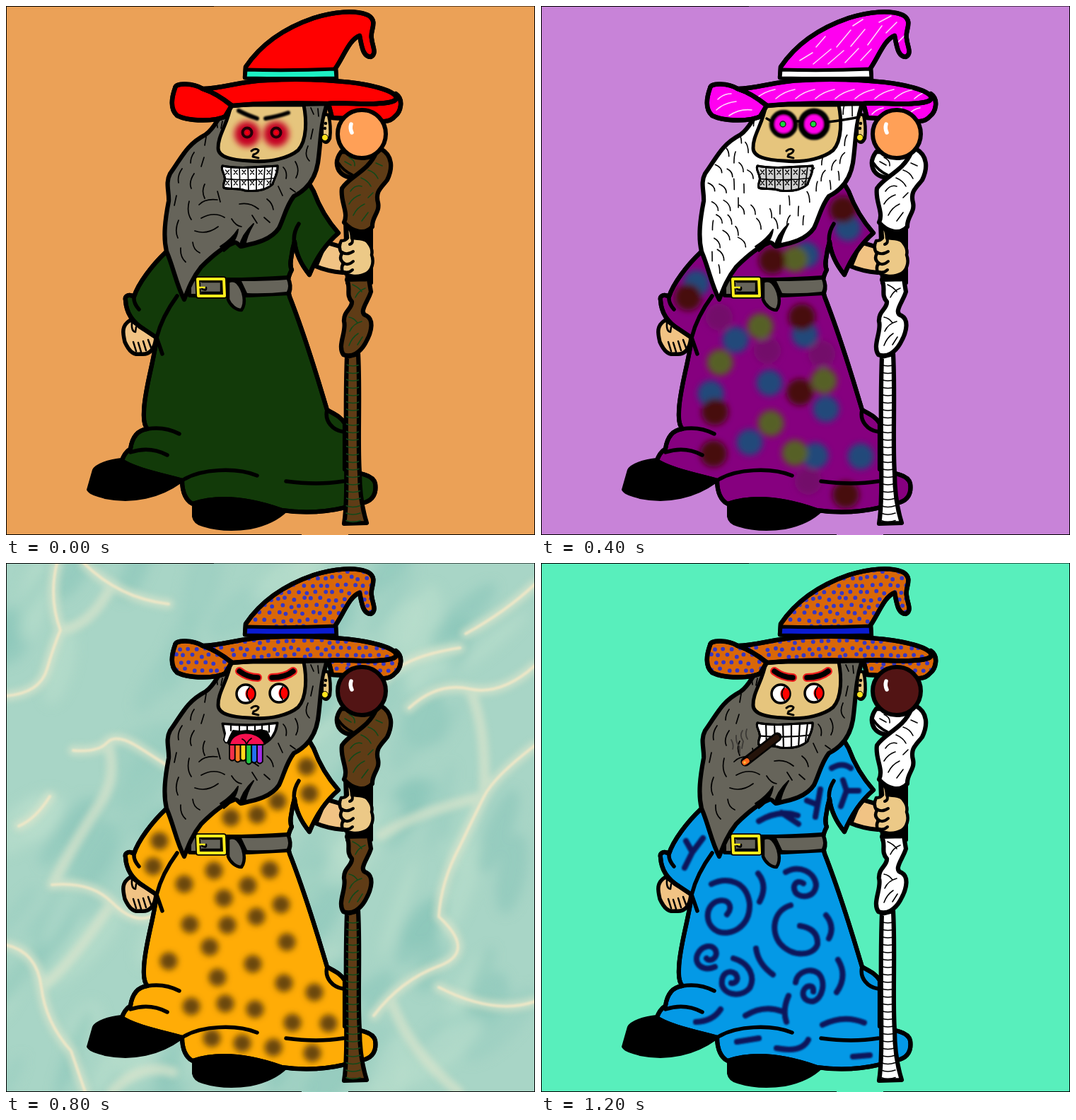
Write an HTML page that moves like this. It is 748 px wide and 748 px high and loops after 1400 ms.

```html
<!DOCTYPE html>
<html lang="en">
<head>
<meta charset="utf-8">
<title>Wizard wardrobe</title>
<style>
html, body { margin: 0; width: 100%; height: 100%; overflow: hidden; }
svg { display: block; width: 100vw; height: 100vh; }
</style>
</head>
<body>
<svg id="stage" viewBox="0 0 748 748" stroke-linecap="round" stroke-linejoin="round"></svg>
<script>
const STEP = 200;
const SKIN = '#e6c57d', FIST = '#ecc987', ARM = '#f1c384', GREY = '#66645a';

// Drawing helpers
const shape = (d, fill, w = 6.2, stroke = '#000') =>
  `<path d="${d}" fill="${fill}" stroke="${stroke}" stroke-width="${w}"/>`;
const line = (d, w = 6, stroke = '#000') => shape(d, 'none', w, stroke);
const disc = (x, y, r, fill, extra = '') =>
  `<circle cx="${x}" cy="${y}" r="${r}" fill="${fill}" ${extra}/>`;
const rect = (x, y, w, h, fill, extra = '') =>
  `<rect x="${x}" y="${y}" width="${w}" height="${h}" fill="${fill}" ${extra}/>`;
const group = (body, attrs) => `<g ${attrs}>${body}</g>`;
const pairs = list => list.trim().split(/\s+/).map(p => p.split(',').map(Number));
const dots = (list, r, fill) => pairs(list).map(([x, y]) => disc(x, y, r, fill)).join('');

function random(seed) {
  return () => (seed = (seed * 16807) % 2147483647) / 2147483647;
}

// Outlines shared by every costume
const ROBE = 'M242,330 L226,348 C207,366 187,392 181,411 C175,407 167,409 169,416 C170,436 180,448 195,457 L213,469 ' +
  'C210,500 195,545 195,574 Q194,592 200,598 C184,600 178,612 176,626 Q167,632 164,643 C180,655 225,664 249,671 ' +
  'C249,688 255,700 264,704 C305,690 350,699 390,713 C425,718 455,715 480,709 L503,703 C520,700 524,688 522,675 ' +
  'C520,667 511,663 500,661 L479,655 L479,590 C472,579 462,576 454,571 C441,528 426,475 401,411 ' +
  'C397,397 397,386 404,373 C400,365 404,355 405,345 L408,333 C410,352 420,369 429,380 C440,353 455,334 470,321 ' +
  'C455,304 443,284 435,262 L428,250 Z';
const BEARD = 'M318,142 C300,151 299,170 282,182 C255,196 248,215 232,237 C225,250 231,263 230,276 ' +
  'C225,302 222,326 227,347 C237,370 241,395 252,415 C258,399 264,384 276,369 C290,355 308,340 322,335 ' +
  'C326,332 328,338 332,340 C350,336 374,332 386,314 C393,300 396,283 407,269 C429,258 438,240 441,222 ' +
  'C445,196 444,170 454,138 Z';
const FACE = 'M318,140 C314,166 299,184 300,201 C300,214 320,218 344,219 C376,222 401,214 413,204 ' +
  'C426,190 425,160 421,140 Z';
const CONE = 'M338,101 L339,86 C362,52 397,30 435,17 C464,8 494,5 512,13 C527,22 514,35 517,46 ' +
  'C518,57 525,67 516,72 C505,72 503,58 500,42 C486,47 478,70 466,88 L467,104 Z';
const BRIM = 'M278,117 C306,117 330,106 370,105 C420,102 490,105 525,115 C548,121 557,129 549,134 ' +
  'C530,142 485,136 456,138 C408,137 360,137 320,141 C306,130 294,122 278,117 Z';
const LOBE = 'M278,117 C265,109 240,108 239,116 C233,133 233,147 242,155 C260,164 298,163 310,156 L319,141 C306,130 294,122 278,117 Z';
const BACK = 'M456,138 C485,136 530,142 549,134 Q554,129 551,124 C563,132 558,150 550,156 C540,168 525,162 500,160 L461,158 Z';
const MOUTH = 'M306,226 C330,231 360,227 384,226 C385,237 378,246 377,252 C365,263 347,262 338,261 C327,257 315,260 308,257 ' +
  'C306,250 311,247 309,242 C309,237 303,231 306,226 Z';
const POLE = 'M482,496 L498,492 C501,550 497,620 500,660 C500,690 505,715 510,731 L478,732 C485,690 478,600 482,496 Z';
const TWIST = 'M530,202 C547,211 547,230 539,246 C530,258 522,262 526,278 C529,292 517,298 518,312 C508,324 490,320 478,306 ' +
  'C485,292 472,276 475,258 C484,242 512,234 523,208 Z';
const LOOP = 'M474,206 C462,222 468,240 489,243 C500,237 516,231 520,209 Z';
const KNOT = 'M482,387 C488,400 480,408 489,418 C490,428 477,431 478,446 C482,460 468,480 477,493 C490,498 501,489 508,477 ' +
  'C519,458 519,443 510,438 C497,434 512,418 516,404 L513,386 Z';

const clip = (id, ...ds) =>
  `<clipPath id="${id}">${ds.map(d => `<path d="${d}"/>`).join('')}</clipPath>`;
const blur = (id, n) =>
  `<filter id="${id}" x="-50%" y="-50%" width="200%" height="200%"><feGaussianBlur stdDeviation="${n}"/></filter>`;
const defs = '<defs>' + clip('inRobe', ROBE) + clip('inHat', CONE, BRIM, LOBE, BACK) + clip('inBeard', BEARD) +
  clip('inMouth', MOUTH) + clip('inPole', POLE) + blur('soft', 1) + blur('fog', 4.5) + blur('mist', 8) + '</defs>';

// Background
function water() {
  const rnd = random(77);
  let pools = '';
  for (let i = 0; i < 110; i++) {
    const x = rnd() * 748, y = rnd() * 748, tilt = 10 + rnd() * 45;
    pools += `<ellipse cx="${x}" cy="${y}" rx="${10 + rnd() * 20}" ry="${35 + rnd() * 45}" ` +
      `fill="${['#86c4b7', '#bcdfcd', '#98cebf'][i % 3]}" opacity=".5" transform="rotate(${tilt} ${x} ${y})"/>`;
  }
  const ripples = 'M0,188 Q48,184 58,150 T77,95 Q60,50 72,0 M95,265 Q130,268 143,254 T190,262 L226,285 ' +
    'M0,540 Q44,550 50,600 T92,690 L112,748 M65,455 Q120,450 150,480 T205,500 M18,372 Q42,362 62,330 ' +
    'M110,0 Q160,50 230,58 M532,168 Q560,132 642,120 M748,145 Q700,188 655,178 T570,205 M748,30 Q705,70 650,100 ' +
    'M748,258 Q690,302 676,330 T642,400 M520,640 Q558,590 612,570 T612,500 Q615,450 642,400 M612,600 Q690,640 748,620 ';
  const folds = 'M545,620 Q570,690 640,748 M150,748 Q190,705 236,720 M530,385 Q580,352 676,330 M77,95 Q120,90 150,30 ' +
    'M143,254 Q160,300 130,345 T65,455 M50,600 Q90,570 150,480 M655,178 Q680,230 676,330';
  return rect(0, 0, 748, 748, '#a8d5c6') + group(pools, 'filter="url(#mist)"') +
    group(line(ripples + folds, 15, '#dbe5cc'), 'filter="url(#fog)" opacity=".65"') +
    group(line(ripples, 4, '#f6e8c6'), 'filter="url(#soft)" opacity=".8"');
}

// Robes
const plain = () => '';
const spots = () => group(dots('425,288 429,326 384,337 318,360 355,356 217,393 208,429 294,435 373,434 342,456 ' +
  '252,454 308,474 389,483 260,511 313,512 354,500 397,536 288,543 230,563 349,567 299,586 393,594 436,607 ' +
  '262,627 310,623 352,631 405,650 456,651 291,672 334,679 378,685 433,693', 12.5, '#6b4707'), 'filter="url(#fog)"');
const blotches = () => group(
  dots('252,440 320,487 397,492 378,672', 19, '#73106b') +
  dots('434,314 375,352 220,392 275,472 373,465 323,533 240,548 403,570 295,617 388,636 452,637', 18.5, '#20487a') +
  dots('359,358 310,453 253,504 400,530 325,590 359,632', 18.5, '#566128') +
  dots('427,288 327,360 208,412 369,440 366,546 246,574 244,633 431,691', 19, '#460810'), 'filter="url(#fog)"');
const swirls = () => {
  const ink = d => line(d, 8, '#08165c');
  return group(ink('M241,454 C264,443 291,450 295,482 C296,515 268,528 250,521 C230,511 232,484 250,478 C264,474 273,485 263,497 ' +
    'M307,439 Q321,456 309,479 M346,437 C365,426 387,437 389,455 C388,473 368,475 360,466 C354,455 362,447 371,453 ' +
    'M353,484 C329,491 324,520 338,538 C355,558 386,556 391,539 Q392,517 366,513 M403,498 Q416,514 407,531') +
  ink('M246,571 C230,578 216,568 221,554 C226,542 241,537 247,548 C251,559 238,565 234,559 M304,545 Q307,567 328,582 ' +
    'M272,559 C296,566 303,586 295,601 C284,614 261,612 256,597 C254,580 266,574 275,581 C281,589 275,595 269,594 ' +
    'M360,593 C362,578 380,572 392,580 C404,592 398,617 384,620 C369,620 367,605 376,599 Q386,596 385,606 M420,561 Q434,584 418,607') +
  ink('M289,640 Q315,624 341,634 M350,612 Q341,632 347,649 M219,649 Q243,648 254,631 M398,653 Q428,638 457,650 ' +
    'M277,677 L308,672 M333,686 Q369,693 378,674 M441,698 L465,696 M308,365 Q336,348 363,357 M340,353 L364,369 ' +
    'M376,336 L389,341 M395,320 L388,359 M411,290 Q426,281 438,290 M427,307 L432,322 L449,322 M432,322 L424,344 ' +
    'M205,393 L214,409 L229,389 M214,409 L203,431'), 'filter="url(#soft)"');
};

const ROBES = {
  green: ['#123a09', plain], purple: ['#86007f', blotches],
  blue: ['#0499e6', swirls], yellow: ['#ffac06', spots]
};

function robe(kind) {
  const [fill, pattern] = ROBES[kind];
  return shape('M163,640 C145,642 127,648 123,656 L115,684 C118,690 127,692 140,696 C180,704 218,695 247,674 Z', '#000', 2) +
    shape('M264,698 L264,722 Q266,732 278,735 C300,742 325,742 345,739 C370,734 385,726 397,714 C355,696 300,690 264,698 Z', '#000', 2) +
    shape('M452,334 L438,368 Q454,375 476,377 L479,342 Z', ARM) +
    shape('M176,444 C163,452 165,462 168,475 C174,488 180,494 190,492 C202,494 211,486 212,468 Z', ARM, 5.5) +
    line('M178,448 Q177,460 183,461 L184,454 M180,475 L184,488 M187,476 L191,489 M194,474 L198,487 M201,472 L205,483', 2.5) +
    shape(ROBE, fill) + group(pattern(), 'clip-path="url(#inRobe)"') + line(ROBE) +
    line('M200,598 Q224,594 245,605 M176,631 Q203,622 228,635 M249,671 C275,654 325,652 355,664 ' +
      'M396,672 Q440,678 477,672 M414,308 Q405,322 408,337 M242,410 Q220,440 213,469 L221,492 ' +
      'M181,411 Q180,420 188,429 M454,571 C450,587 462,600 477,602', 5.5);
}

function belt() {
  return shape('M258,386 Q330,389 398,384 Q404,396 400,406 Q330,411 260,409 Z', '#000') +
    shape('M262,389 L308,389 L309,407 L262,407 Z', GREY, 0) +
    shape('M333,389 Q370,389 397,387 Q401,396 397,404 Q370,407 341,406 Z', GREY, 0) +
    shape('M314,390 Q321,386 327,391 C337,402 340,420 333,430 C325,430 317,423 314,415 Z', GREY, 4.5) +
    line('M271,386 L308,386 L309,410 L272,410 Z', 7.5) +
    line('M271,386 L308,386 L309,410 L272,410 Z', 4, '#ffec1c') + line('M272,398 L281,398', 2.5, '#ffec1c') +
    line('M277,390 L304,390 L304,405 L277,405 M277,400 Q284,404 283,398', 2.5);
}

// Beards
const HAIRS = '302,164 282,188 291,200 264,207 274,214 251,230 267,236 283,228 296,238 241,256 257,258 273,252 ' +
  '287,258 246,283 263,282 279,278 243,310 252,301 267,302 284,288 300,288 325,293 338,288 ' +
  '351,275 364,290 378,270 390,255 384,235 399,240 399,217 414,225 426,215 421,240 431,190 428,147 ' +
  '440,148 409,253 371,303 350,303 332,307 308,308 277,318 262,324 249,335 284,334 242,354 254,352 252,372';
const CURLS = 'M298,162 L299,172 M306,163 L304,173 M283,185 L281,197 M266,207 Q261,214 261,222 M280,214 L276,227 M249,230 Q242,240 244,250 ' +
  'M266,237 Q258,249 262,258 M241,268 L238,282 M281,252 Q276,262 281,272 M259,276 Q255,292 262,302 M244,303 Q238,317 243,328 ' +
  'M276,300 Q294,290 309,299 M273,281 Q281,272 299,274 M299,262 L303,277';
const CURLS2 = 'M267,318 Q284,324 300,312 M247,342 Q246,355 254,362 M264,334 Q265,345 274,349 M319,301 Q325,311 333,312 M330,280 Q345,277 357,287 ' +
  'M348,296 L355,307 M369,273 Q377,279 378,288 M385,255 L391,268 M392,228 Q398,234 396,244 M409,220 Q416,232 410,243 ' +
  'M427,198 Q421,211 429,219 M434,174 L431,188 M431,144 L435,153 M441,145 L442,156 M365,299 L373,306 M402,258 L409,263';

function beard(kind) {
  const white = kind === 'white';
  const rnd = random(31);
  const hair = pairs(HAIRS).map(([x, y]) => {
    const lean = (x < 345 ? 2 : -2) + rnd() * 14 - 5, drop = 11 + rnd() * 5;
    return `M${x - lean / 2},${y - drop / 2} q${lean},${drop / 3} ${lean},${drop}`;
  }).join('');
  return shape(BEARD, white ? '#fff' : GREY) +
    group(white ? line(hair, 1.6) : line(CURLS + CURLS2, 1.7), 'clip-path="url(#inBeard)"') +
    shape('M308,347 Q326,334 328,316 Q319,330 303,340 Z', '#000', 2) +
    shape('M330,341 Q333,324 350,308 Q340,325 338,339 Z', '#000', 2);
}

// Faces
const NOSE = line('M347,205 Q353,200 357,204 Q357,208 350,210 L349,213 L357,215', 3);
const FACES = {
  angry() {
    const brows = 'M330,153 Q342,162 356,162 M376,162 Q395,162 406,153';
    const eye = (x, y) => disc(x, y, 13, '#fff', 'stroke="#000" stroke-width="3.5"') +
      `<ellipse cx="${x + 6}" cy="${y}" rx="6.5" ry="8.5" fill="#f00"/>` + line(`M${x + 5},${y - 9} q-7,9 0,18`, 2);
    return line(brows, 12, '#ee1c1c') + line(brows, 7.5) + eye(339, 185) + eye(386, 184);
  },
  glow() {
    const eye = x => disc(x, 181, 18, '#c40022', 'filter="url(#fog)"') +
      disc(x, 179, 6.5, '#d00020', 'stroke="#240006" stroke-width="4"') + disc(x, 179, 2, '#f00');
    return eye(341) + eye(382) + group(line('M329,148 Q340,154 355,159 M367,159 Q385,156 399,151', 6), 'filter="url(#soft)"');
  },
  glasses() {
    const lens = (x, r, rim) => disc(x, 167, r, '#ff00e8', `stroke="#000" stroke-width="${rim}" filter="url(#soft)"`) +
      `<ellipse cx="${x - 1}" cy="167" rx="4" ry="4" fill="#18d83c" stroke="#222" stroke-width="1.5"/>`;
    return line('M362,163 L369,163 M326,163 L319,159 M406,164 Q430,161 450,157', 3.5) + lens(343, 16.5, 7.5) + lens(386, 18, 9);
  },
  dizzy() {
    const coil = x => {
      let d = '';
      for (let i = 0; i <= 44; i++) {
        const a = i * .36, r = .8 + i * .21;
        d += `${i ? 'L' : 'M'}${(x + r * Math.cos(a) * 1.08).toFixed(1)},${(178 + r * Math.sin(a)).toFixed(1)}`;
      }
      return line(d, 2, '#f52a1c');
    };
    return group(disc(321, 202, 12, '#000') + disc(380, 207, 12, '#000'), 'filter="url(#fog)" opacity=".9"') +
      coil(343) + coil(377) +
      line('M335,167 Q346,159 356,168 M363,169 Q376,160 388,168 M350,148 L359,156 L367,148', 3) +
      line('M395,153 L404,164 M400,149 L409,160 M405,146 L412,155', 2, '#f52a1c') + line('M393,164 L413,150', 2.5);
  }
};

// Mouths
const inMouth = body => group(body, 'clip-path="url(#inMouth)"');
const gaps = 'M318,226 L319,260 M330,226 L331,262 M342,226 L343,262 M354,226 L354,262 M366,226 L364,262 M377,226 L373,262 M304,244 Q345,248 384,243';

function braces(fill) {
  let wires = '';
  for (let row = 0; row < 2; row++)
    for (let i = 0; i < 7; i++) wires += `M${310.5 + i * 11.7},${232 + row * 15} l5,6 m0,-6 l-5,6`;
  return shape(MOUTH, fill, 3) + inMouth(line(gaps, 1.7) + line(wires, 1.2)) + line(MOUTH, 3);
}
const MOUTHS = {
  braces: () => braces('#fff'),
  steel: () => braces('#d2d2d2'),
  gold() {
    let cells = '';
    for (let i = 0; i < 7; i++)
      for (let row = 0; row < 3; row++)
        if ((i + row) % 2) cells += rect(306 + i * 11.5, 224 + row * 13, 11.5, 13, '#000');
    return shape(MOUTH, '#efc02b', 4) + inMouth(cells + line(gaps, 1.6)) + line(MOUTH, 4);
  },
  cigar: () => shape(MOUTH, '#fff', 3) + inMouth(line(gaps, 2.2)) + line(MOUTH, 3) +
    line('M334,246 L289,281', 13) + line('M333,247 L297,275', 8, '#24130a') +
    line('M291,280 L288,282', 7.5, '#ff6a1c') + disc(288, 282, 1.7, '#ffc23c') +
    line('M269,250 Q273,257 271,263 M276,244 Q275,254 281,260 L281,269 M285,237 Q280,244 286,252 L284,262 M291,235 Q288,243 292,249', 1.8, '#3c3a36'),
  rainbow() {
    const drips = ['#f2304a', '#ff7b22', '#ffd91c', '#20c840', '#2470f0', '#a22ce8'].map((c, i) =>
      shape(`M${316 + i * 7.8},257 h7.8 v${20 + [0, 2, 0, 5, 3, 4][i]} q-4,5 -7.8,0 Z`, c, 1.8)).join('');
    return shape('M306,227 Q345,231 384,226 Q382,246 366,255 L317,257 Q311,254 306,227 Z', '#000', 3) +
      shape('M307,228 Q345,232 383,227 L380,238 L374,249 L369,238 L360,236 L351,238 L341,237 L331,238 L321,237 L316,247 Q312,260 308,250 L310,241 Z', '#fff', 2) +
      line('M318,230 V237 M330,230 V237 M341,231 V237 M352,230 V237 M362,230 V236 M372,229 V239', 2) +
      shape('M316,258 C318,236 356,234 366,256 Q342,265 316,258 Z', '#f5104f', 2) +
      drips + line('M334,249 Q339,251 340,257 M347,248 Q342,251 340,257', 1.8);
  }
};

// Hats
function speckles() {
  const rnd = random(12);
  let out = '';
  for (let row = 0; row < 16; row++)
    for (let i = 0; i < 28; i++)
      out += disc(238 + i * 12 + row % 2 * 6 + rnd() * 5, 9 + row * 10 + rnd() * 4, 2.9, '#3737c4');
  return out;
}
function strokes() {
  const cone = 'M366,77 L384,66 M385,82 L410,61 M406,82 L428,63 M389,58 L402,43 M418,58 L438,34 M430,80 L449,60 ' +
    'M438,57 L458,33 M452,77 L467,61 M462,55 L482,28 M441,28 L455,19 M478,23 L495,14 M488,38 L503,23 M505,51 L514,42 ';
  const lobe = 'M250,132 Q258,124 269,124 M248,147 Q259,137 276,135 M266,155 Q281,145 298,147 ';
  let brim = '';
  for (let x = 304; x < 530; x += 28) brim += `M${x},131 q11,-10 27,-13`;
  for (let x = 468; x < 540; x += 26) brim += `M${x},153 q6,-7 16,-9`;
  return line(cone + lobe + brim, 1.6, '#ffd5fb');
}

const HATS = {
  red: ['#ff0000', '#1df0c4', plain],
  spotted: ['#d96708', '#0a1bd0', speckles],
  pink: ['#ff00f0', '#ffffff', strokes]
};

function hat(kind) {
  const [fill, band, pattern] = HATS[kind];
  const parts = [BACK, CONE, LOBE, BRIM];
  return parts.map(d => shape(d, fill)).join('') + group(pattern(), 'clip-path="url(#inHat)"') +
    parts.map(d => line(d, 6.5)).join('') +
    shape('M339,90 Q400,92 466,89 L467,102 Q400,103 338,102 Z', band, 5);
}

// Staff
const STAVES = { brown: ['#5f3c16', '#12491a'], grey: ['#8b8989', '#f22020'], white: ['#ffffff', '#000000'] };

function staff(kind) {
  const [fill, ink] = STAVES[kind];
  let rings = '';
  for (let y = 507; y < 730; y += 10.5) rings += `M481,${y} q9,4 20,0`;
  return shape('M479,306 L517,308 L517,392 L482,392 Z', '#000', 4) +
    shape(POLE, fill) + group(line(rings, 1.6, ink), 'clip-path="url(#inPole)"') +
    shape(KNOT, fill) + shape(LOOP, fill) + shape(TWIST, fill) + line('M470,222 Q477,233 490,239', 4) +
    line('M479,220 L488,225 M485,214 Q494,218 493,226 M502,243 Q512,247 516,255 M512,232 Q522,235 526,244 M523,222 L532,226 ' +
      'M487,262 Q494,252 503,255 M485,280 Q491,270 501,267 M491,296 Q496,285 507,280 M503,304 L512,292 M512,271 L519,264 ' +
      'M490,394 Q499,398 503,404 M494,412 Q498,403 508,399 M485,440 Q492,441 497,448 M486,460 Q491,449 503,446 ' +
      'M485,480 Q489,469 498,463 M497,479 L504,468', 1.6, ink);
}

const fist = () =>
  shape('M474,332 Q480,332 483,328 L482,315 Q488,312 489,328 C500,329 510,329 513,336 Q519,344 517,352 C521,362 517,374 510,378 ' +
    'C499,384 484,383 476,376 Q473,368 478,364 Q470,358 475,350 Q469,342 474,332 Z', FIST, 4.5) +
  line('M475,348 Q482,353 491,347 M477,363 Q483,368 491,361 M478,376 Q485,378 490,373 M489,328 Q492,335 486,337', 4);

const orb = fill => disc(503, 181, 34, fill, 'stroke="#000" stroke-width="6"') +
  line('M488,167 Q486,173 489,179', 5.5, '#fff');

const ear = () => shape('M450,153 Q446,166 447,188 Q453,198 458,187 Q460,170 456,154 Z', SKIN, 4.5) +
  dots('452,166 451,173', 2.2, '#000') + disc(451, 186, 4.5, '#ffe21c', 'stroke="#000" stroke-width="1"');

const frame = () => rect(0, 0, 1, 748, '#000') + rect(747, 0, 1, 748, '#000') +
  rect(0, 0, 294, 1, '#000') + rect(294, 0, 454, 1, '#000', 'opacity=".6"') +
  rect(0, 747, 418, 1, '#000') + rect(484, 747, 264, 1, '#000');

const PEACH = '#ffa057', WINE = '#521414';
const LOOKS = [
  { bg: '#eba157', hat: 'red', beard: 'grey', face: 'glow', mouth: 'braces', robe: 'green', staff: 'brown', orb: PEACH },
  { bg: '#f07878', hat: 'spotted', beard: 'white', face: 'angry', mouth: 'gold', robe: 'green', staff: 'grey', orb: WINE },
  { bg: '#c883d8', hat: 'pink', beard: 'white', face: 'glasses', mouth: 'steel', robe: 'purple', staff: 'white', orb: PEACH },
  { bg: '#e6f64f', hat: 'red', beard: 'white', face: 'angry', mouth: 'cigar', robe: 'blue', staff: 'white', orb: PEACH },
  { bg: 'water', hat: 'spotted', beard: 'grey', face: 'angry', mouth: 'rainbow', robe: 'yellow', staff: 'brown', orb: WINE },
  { bg: '#3daa6b', hat: 'red', beard: 'white', face: 'dizzy', mouth: 'gold', robe: 'blue', staff: 'grey', orb: '#ff00ff' },
  { bg: '#58efbc', hat: 'spotted', beard: 'grey', face: 'angry', mouth: 'cigar', robe: 'blue', staff: 'white', orb: WINE }
];

const wizard = look => (look.bg === 'water' ? water() : rect(0, 0, 748, 748, look.bg)) +
  robe(look.robe) + belt() + beard(look.beard) + shape(FACE, SKIN, 5) + ear() + FACES[look.face]() + NOSE +
  MOUTHS[look.mouth]() + hat(look.hat) + staff(look.staff) + fist() + orb(look.orb) + frame();

const stage = document.getElementById('stage');
stage.innerHTML = defs + LOOKS.map(look => group(wizard(look), 'class="look" display="none"')).join('');
const layers = stage.querySelectorAll('.look');
let shown = -1;

function update() {
  const now = Math.floor(performance.now() / STEP) % LOOKS.length;
  if (now !== shown) {
    layers.forEach((layer, i) => layer.setAttribute('display', i === now ? 'inline' : 'none'));
    shown = now;
  }
  requestAnimationFrame(update);
}
update();
</script>
</body>
</html>
```
